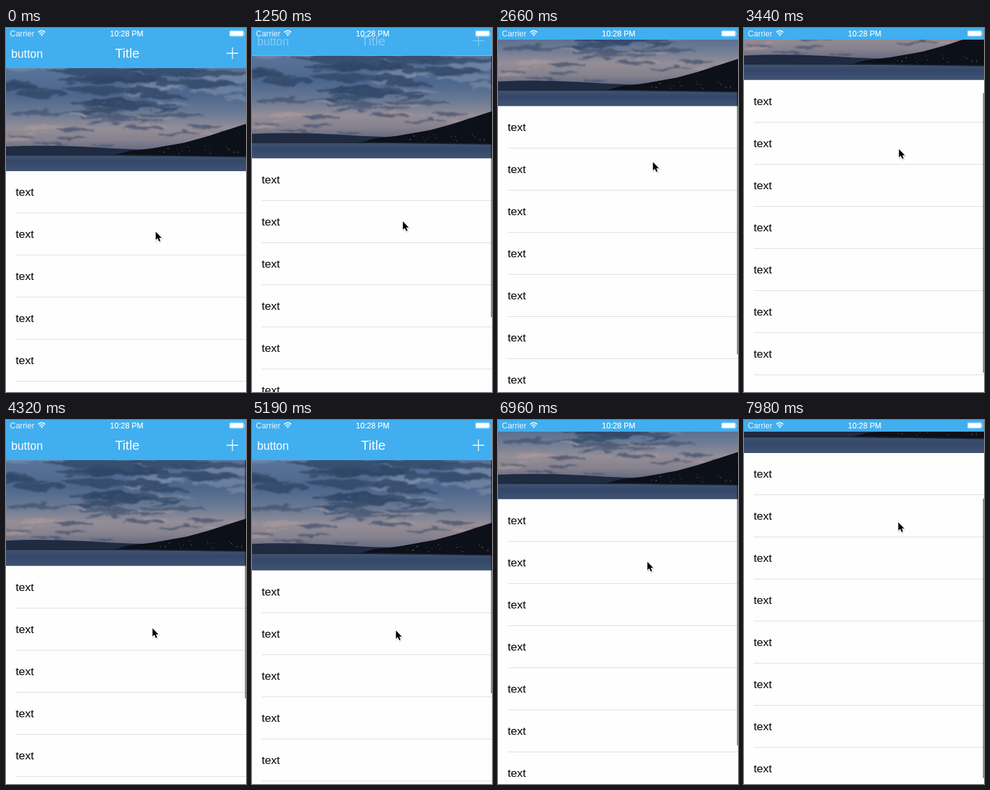
These frames come from a looping animation (371x562 px, 8000 ms). An HTML page:

```html
<!DOCTYPE html>
<html lang="en">
<head>
<meta charset="utf-8">
<title>Stretchy list header</title>
<style>
  html, body { margin: 0; width: 100%; height: 100%; overflow: hidden; background: #fefefe; }
  svg { display: block; width: 100%; height: 100%; font-family: "Liberation Sans", Arial, sans-serif; }
</style>
</head>
<body>
<svg viewBox="0 0 371 562" xmlns="http://www.w3.org/2000/svg">
  <defs>
    <linearGradient id="sky" x1="0" y1="0" x2="0" y2="1">
      <stop offset="0" stop-color="#5a7499"/>
      <stop offset=".3" stop-color="#4d668c"/>
      <stop offset=".52" stop-color="#6b7b95"/>
      <stop offset=".68" stop-color="#958e97"/>
      <stop offset=".82" stop-color="#85818d"/>
      <stop offset="1" stop-color="#4e5b77"/>
    </linearGradient>
    <linearGradient id="sea" x1="0" y1="0" x2="0" y2="1">
      <stop offset="0" stop-color="#42546f"/>
      <stop offset=".4" stop-color="#34476a"/>
      <stop offset="1" stop-color="#405371"/>
    </linearGradient>
    <filter id="ragged" x="-20" y="-10" width="411" height="150" filterUnits="userSpaceOnUse">
      <feTurbulence type="fractalNoise" baseFrequency=".03 .09" numOctaves="4" seed="4"/>
      <feDisplacementMap in="SourceGraphic" scale="16" xChannelSelector="R" yChannelSelector="G"/>
      <feGaussianBlur stdDeviation="1"/>
    </filter>
    <clipPath id="frame"><rect width="371" height="159"/></clipPath>
    <path id="arrow" d="M0 0V12.8L2.9 10.1L5.1 15L7.2 14.1L5.2 9.4H9.1Z"/>
  </defs>

  <rect width="371" height="562" fill="#fefefe"/>
  <g id="photo"><g clip-path="url(#frame)">
    <rect width="371" height="136" fill="url(#sky)"/>
    <g id="clouds" filter="url(#ragged)"/>
    <path d="M0 121Q40 119 80 120T150 123T225 126V136H0Z" fill="#202b42"/>
    <path d="M160 136L190 128L225 124L276 115L309 106L340 96L371 86V140H160Z" fill="#0c1018"/>
    <g id="lights" fill="#c49b78"/>
    <path d="M0 134L371 136.5V159H0Z" fill="url(#sea)"/>
    <path d="M0 134.3H190L371 137" fill="none" stroke="#1b263a" stroke-width="1.5"/>
  </g></g>

  <g id="list"><rect width="371" height="900" fill="#fefefe"/></g>
  <rect id="thumb" x="369.4" width="1.6" rx=".8" fill="#000"/>

  <rect id="bar" width="371" fill="#40aeef"/>
  <g id="nav" fill="#fff">
    <text x="8" y="46" font-size="17.6">button</text>
    <text x="187.5" y="46" font-size="20.5" text-anchor="middle">Title</text>
    <path d="M341 39H359M350 30V48" stroke="#fff" stroke-width="1.3"/>
  </g>

  <g fill="#fff">
    <text x="6" y="12.7" font-size="12.4" opacity=".9">Carrier</text>
    <text x="186.5" y="12.7" font-size="12" text-anchor="middle" stroke="#fff" stroke-width=".2">10:28 PM</text>
    <path d="M49.8 6.6Q55.3 1.6 60.8 6.6M51.8 9Q55.3 5.9 58.8 9" fill="none" stroke="#fff" stroke-width="1.5"/>
    <path d="M53.3 10.5Q55.3 8.8 57.3 10.5L55.3 12.6Z"/>
    <rect x="345.4" y="3.9" width="22" height="9.2" rx="1.8" fill="none" stroke="#fff" stroke-width=".8" opacity=".5"/>
    <rect x="346.2" y="4.7" width="20.4" height="7.6" rx="1"/>
    <path d="M368.3 6.8Q370 8.5 368.3 10.2Z"/>
  </g>

  <g id="cursor">
    <use href="#arrow" x=".8" y="1.4" stroke="#000" stroke-width="2" opacity=".13"/>
    <use href="#arrow" stroke="#fff" stroke-width="1.6" paint-order="stroke"/>
  </g>
</svg>
<script>
const LOOP = 8000, ROW = 65, PHOTO = 159, BAR_MIN = 18, BAR_MAX = 62;
const $ = id => document.getElementById(id);
const clamp = (v, lo, hi) => Math.min(hi, Math.max(lo, v));
const mix = (a, b, u) => a + (b - a) * u;
const smooth = u => u * u * (3 - 2 * u);

function add(parent, tag, attrs, text) {
  const el = document.createElementNS("http://www.w3.org/2000/svg", tag);
  for (const k in attrs) el.setAttribute(k, attrs[k]);
  if (text) el.textContent = text;
  parent.appendChild(el);
}

function random(seed) {
  return () => (seed = (seed * 16807) % 2147483647) / 2147483647;
}
const rnd = random(77);

// Streaks of cloud, flatter and shorter towards the horizon
function streaks(count, top, bottom, fill, opacity) {
  for (let i = 0; i < count; i++) {
    const cy = mix(top, bottom, (i + rnd()) / count), near = 1 - cy / 150;
    add($("clouds"), "ellipse", {
      cx: rnd() * 371, cy, rx: mix(25, 75, rnd()) * near + 12, ry: mix(2, 7, rnd()) * near + .8, fill, opacity
    });
  }
}
streaks(9, 0, 60, "#8294ad", .55);
streaks(8, 68, 110, "#b89f9b", .5);
streaks(22, 0, 68, "#2f4464", .75);
streaks(16, 68, 120, "#44536f", .75);

for (let i = 0; i < 22; i++)
  add($("lights"), "circle", { cx: mix(235, 368, rnd()), cy: mix(121, 132, rnd()), r: mix(.4, .8, rnd()), opacity: mix(.3, .9, rnd()) });

for (let i = 0; i < 9; i++) {
  add($("list"), "text", { x: 15, y: i * ROW + 38, "font-size": 17.4 }, "text");
  add($("list"), "rect", { x: 15, y: i * ROW + 64, width: 356, height: 1, fill: "#dfdfe1" });
}

// Each drag eases to a photo bottom, a pointer x and the pointer's distance below the photo
const rest = { bottom: 221, x: 231.5, grip: 93.5 };
const drag = (from, to, bottom, x, grip) => ({ from, to, bottom, x, grip });
const drags = [
  drag(540, 720, 221, 231.5, 101),
  drag(950, 1960, 129.5, 239.5, 82),
  drag(2370, 3440, 80.5, 239.5, 106.5),
  drag(3440, 4320, 225.5, 226.5, 96),
  drag(4320, 4780, 221, 223, 85),
  drag(4960, 5190, 232.5, 222.5, 92.5),
  drag(5190, 6150, 189, 222.5, 86),
  drag(6150, 7680, 67, 238, 105),
  drag(7860, 7980, 51, 238.5, 107)
];

function pose(t) {
  const p = { ...rest };
  for (const d of drags) {
    const u = smooth(clamp((t - d.from) / (d.to - d.from), 0, 1));
    for (const k in p) p[k] = mix(p[k], d[k], u);
  }
  return p;
}

function render(t) {
  const { bottom, x, grip } = pose(t);
  const barEnd = clamp(bottom - PHOTO, BAR_MIN, BAR_MAX);
  const zoom = Math.max(1, (bottom - barEnd) / PHOTO);
  $("photo").setAttribute("transform", `translate(185.5 ${bottom}) scale(${zoom}) translate(-185.5 ${-PHOTO})`);
  $("list").setAttribute("transform", `translate(0 ${Math.round(bottom)})`);
  $("bar").setAttribute("height", barEnd);
  $("nav").setAttribute("transform", `translate(0 ${barEnd - BAR_MAX})`);
  $("nav").setAttribute("opacity", clamp((barEnd - 31) / 31, 0, 1));

  const thumbEnd = 589 - bottom * .705 - Math.max(0, bottom - 227) * .5;
  const thumbTop = Math.max(barEnd, thumbEnd - 432);
  $("thumb").setAttribute("y", thumbTop);
  $("thumb").setAttribute("height", thumbEnd - thumbTop);
  $("thumb").setAttribute("opacity", t < 950 ? 0 : .5);

  $("cursor").setAttribute("transform", `translate(${x} ${bottom + grip})`);
}

let start;
function tick(now) {
  start ??= now;
  render((now - start) % LOOP);
  requestAnimationFrame(tick);
}
render(0);
requestAnimationFrame(tick);
</script>
</body>
</html>
```
